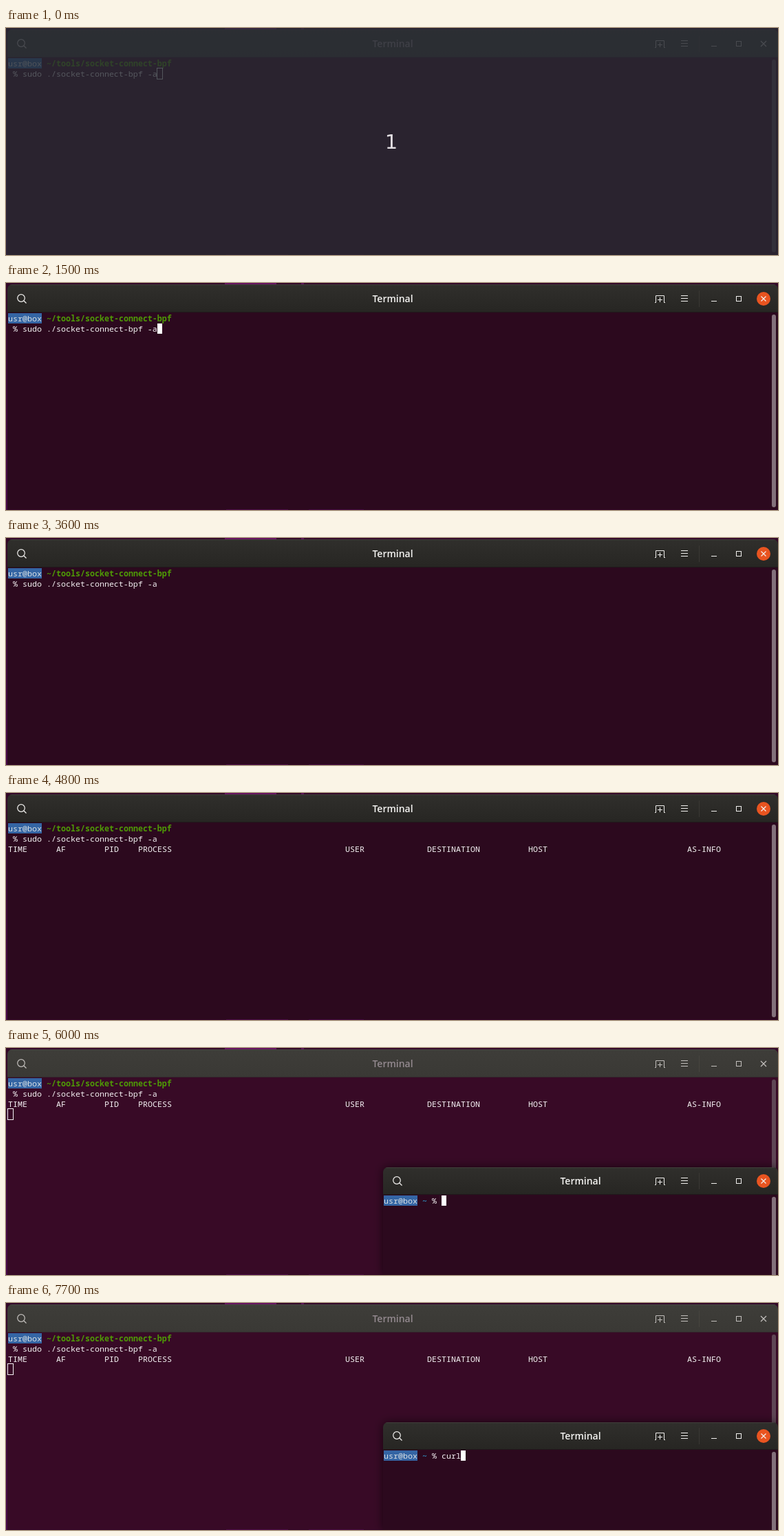
An HTML page with a canvas that plays this animation: 1122 by 331 pixels, repeating every 8000 ms.

```html
<!DOCTYPE html>
<html lang="en">
<head>
<meta charset="utf-8">
<title>Terminal</title>
<style>
html, body { margin: 0; width: 100%; height: 100%; overflow: hidden; background: #2c091e; }
canvas { display: block; }
</style>
</head>
<body>
<canvas id="stage" width="1122" height="331"></canvas>
<script>
const W = 1122, H = 331, LOOP = 8000, COL = 7, ROW = 15;
const MONO = '11.667px "Noto Sans Mono", "DejaVu Sans Mono", monospace';
const ctx = document.getElementById('stage').getContext('2d');
const USER = 'usr@box';
const HEADINGS = [[0, 'TIME'], [10, 'AF'], [20, 'PID'], [27, 'PROCESS'], [70, 'USER'],
  [87, 'DESTINATION'], [108, 'HOST'], [141, 'AS-INFO']];

// Value of the last [time, value] step already reached
const at = (steps, t) => steps.filter(s => s[0] <= t).pop()[1];

function rect(x, y, w, h, color) {
  ctx.fillStyle = color;
  ctx.fillRect(x, y, w, h);
}

function lines(color, width, ...paths) {
  ctx.strokeStyle = color;
  ctx.lineWidth = width;
  ctx.beginPath();
  for (const p of paths)
    for (let i = 0; i < p.length; i += 2) ctx[i ? 'lineTo' : 'moveTo'](p[i], p[i + 1]);
  ctx.stroke();
}

function circle(x, y, r) {
  ctx.beginPath();
  ctx.arc(x, y, r, 0, 7);
}

function desktop() {
  rect(0, 0, W, H, '#330727');
  rect(318, 0, 75, 2, '#66115f');
  rect(429, 0, 4, 2, '#5a1055');
  const side = ctx.createLinearGradient(0, 0, 0, H);
  side.addColorStop(0, '#330727');
  side.addColorStop(1, '#480849');
  rect(0, 0, 2, H, side);
  rect(320, 330, 90, 1, '#4d0d49');
  rect(440, 330, 80, 1, '#460b42');
}

function icons(y, active) {
  const c = active ? '#f2f1ef' : '#c3c0bd';
  lines(c, 1.2, [26, y + 26, 29.5, y + 29.5]);
  circle(22, y + 22, 5.3);
  ctx.stroke();
}

function controls(y, active) {
  const c = active ? '#f2f1ef' : '#c3c0bd';
  lines(c, 1,
    [943, y + 28.5, 944.5, y + 28.5, 944.5, y + 18.5, 956.5, y + 18.5, 956.5, y + 28.5, 958, y + 28.5],
    [947, y + 24.5, 954, y + 24.5], [950.5, y + 21, 950.5, y + 28],
    [981, y + 18.5, 991, y + 18.5], [981, y + 22.5, 991, y + 22.5], [981, y + 26.5, 991, y + 26.5],
    [1025, y + 26.5, 1033, y + 26.5]);
  ctx.strokeRect(1061.5, y + 19.5, 7, 7);
  lines(active ? '#3a3834' : '#47453f', 1, [1007.5, y + 11, 1007.5, y + 35]);
  if (active) {
    circle(1101, y + 23, 10);
    ctx.fillStyle = '#e95420';
    ctx.fill();
  }
  const r = active ? 3.5 : 4;
  lines(c, 1.2, [1101 - r, y + 23 - r, 1101 + r, y + 23 + r],
    [1101 - r, y + 23 + r, 1101 + r, y + 23 - r]);
}

// Window frame; y is the offset from the main window's rows
function frame(left, top, y, active) {
  const bg = active ? '#2c091e' : '#380a26';
  ctx.save();
  ctx.beginPath();
  ctx.roundRect(left, top, W - left, H - top - (y ? 0 : 1), [7, 7, 0, 0]);
  if (y) {
    ctx.shadowColor = active ? 'rgba(0,0,0,.6)' : 'rgba(0,0,0,.35)';
    ctx.shadowBlur = active ? 14 : 6;
  }
  ctx.fillStyle = bg;
  ctx.fill();
  ctx.shadowColor = 'transparent';
  ctx.clip();
  const bar = ctx.createLinearGradient(0, top, 0, y + 42);
  bar.addColorStop(0, active ? '#302f2c' : '#3e3d39');
  bar.addColorStop(1, active ? '#272623' : '#3a3935');
  rect(left, top, W - left, y + 42 - top, bar);
  rect(left, top, W - left, 1, active ? '#403f3b' : '#484743');
  rect(left, y + 42, W - left, 1, active ? '#1f1a1b' : '#33262c');
  ctx.restore();

  ctx.save();
  ctx.translate(left - 2, 0);
  icons(y, active);
  ctx.restore();
  controls(y, active);

  ctx.font = '600 14px "Open Sans", "Noto Sans", sans-serif';
  ctx.textAlign = 'center';
  ctx.fillStyle = active ? '#f4f3f1' : '#93898f';
  ctx.fillText('Terminal', (left + W) / 2, y + 28);

  ctx.beginPath();
  ctx.roundRect(1113, y + 46, 6, y ? H : 281, 3);
  ctx.fillStyle = active ? '#83707b' : '#5f4655';
  ctx.fill();
}

// Character grid whose top left corner is x, y
function grid(x, y) {
  return {
    text(col, row, s, color = '#f4f1f3', bold = false) {
      ctx.textAlign = 'left';
      ctx.font = (bold ? 'bold ' : '') + MONO;
      ctx.fillStyle = color;
      ctx.fillText(s, x + col * COL, y + row * ROW + 12);
    },
    user() {
      rect(x, y, 7 * COL, ROW, '#3465a4');
      this.text(0, 0, USER, '#d9e0e4');
    },
    cursor(col, row, filled) {
      const cx = x + col * COL, cy = y + row * ROW;
      if (filled) return rect(cx, cy, COL, ROW, '#ffffff');
      ctx.strokeStyle = '#f4f1f3';
      ctx.lineWidth = 1;
      ctx.strokeRect(cx - .5, cy - .5, COL + 1, ROW + 1);
    }
  };
}

function mainWindow(t) {
  const active = t >= 1500 && t < 6000;
  frame(2, 2, 0, active);
  const g = grid(3, 44);
  g.user();
  g.text(8, 0, '~/tools/socket-connect-bpf', '#4e9a06', true);
  g.text(1, 1, '% sudo ./socket-connect-bpf -a');
  if (t >= 4500) for (const [col, s] of HEADINGS) g.text(col, 2, s);

  const [col, row] = at([[0, [31, 1]], [1600, [0, 2]], [4500, [0, 3]]], t);
  const shown = at([[0, 1], [1600, 0], [2000, 1], [2400, 0], [3100, 1], [3600, 0],
    [4500, 1], [4800, 0], [5400, 1]], t);
  if (shown) g.cursor(col, row, active);
}

function secondWindow(t) {
  const active = t >= 6000;
  frame(548, 174, 171, active);
  const g = grid(549, 215);
  g.user();
  g.text(8, 0, '~', '#2f86b4', true);
  g.text(10, 0, '%');
  const typed = at([[0, ''], [6400, 'c'], [6900, 'cu'], [7000, 'cur'], [7600, 'curl']], t);
  g.text(12, 0, typed);
  if (at([[0, 1], [6200, 0], [6400, 1], [7500, 0], [7600, 1]], t))
    g.cursor(12 + typed.length, 0, active);
}

function countdown() {
  rect(0, 0, W, H, 'rgba(39,43,50,.78)');
  ctx.font = '29px "DejaVu Sans", sans-serif';
  ctx.textAlign = 'center';
  ctx.fillStyle = '#e2dee2';
  ctx.fillText('1', 560, 176);
}

function draw() {
  const t = performance.now() % LOOP;
  desktop();
  mainWindow(t);
  if (t >= 5600) secondWindow(t);
  if (t < 100) countdown();
  requestAnimationFrame(draw);
}
draw();
</script>
</body>
</html>
```
